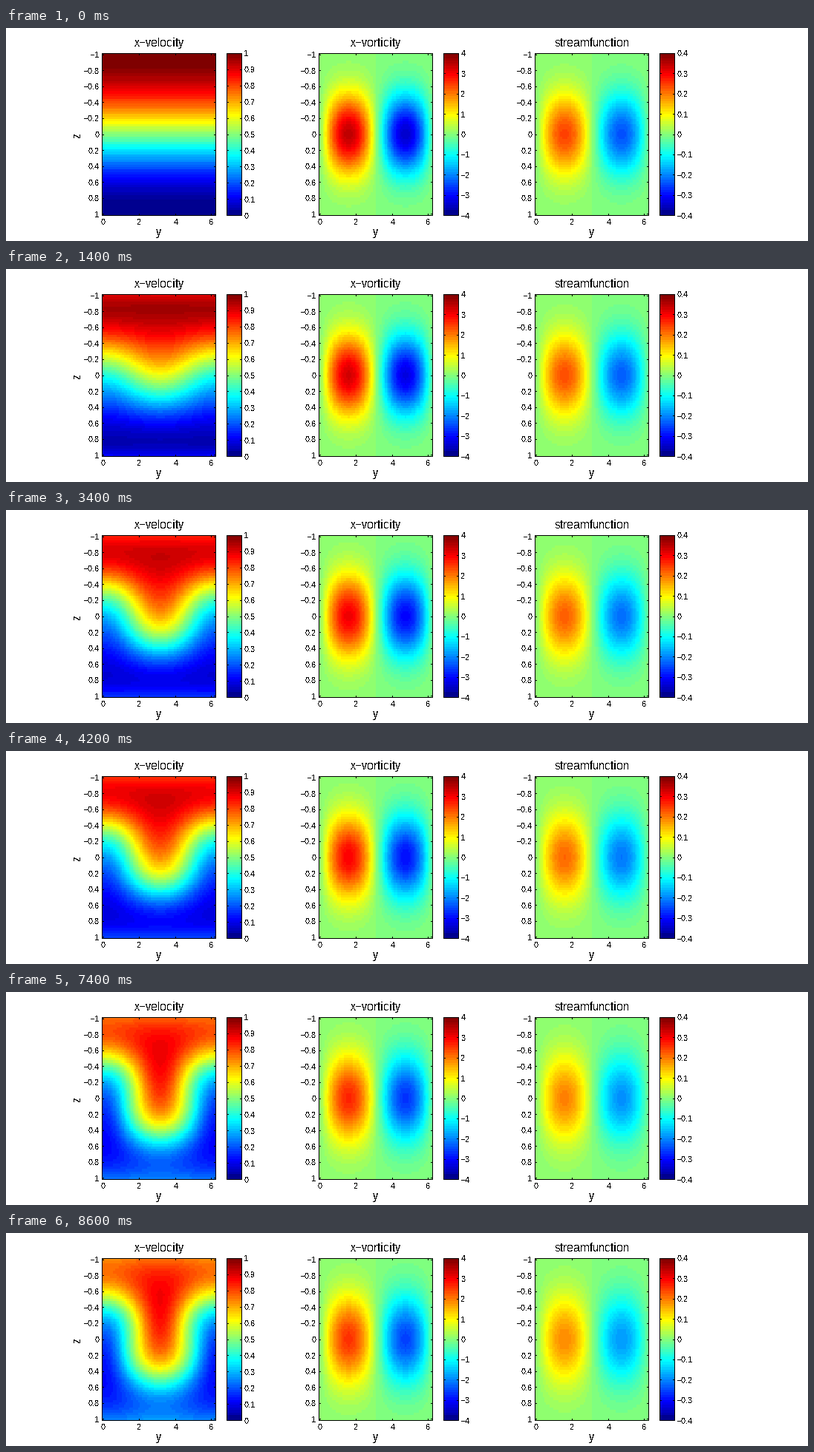
Recreate the animation shown at these times as a matplotlib script. Size 1080 by 288 pixels, loop 9200 ms.

```python
import numpy as np
import matplotlib.pyplot as plt
from matplotlib.animation import FuncAnimation
from matplotlib.colors import ListedColormap
from matplotlib.patches import Rectangle

plt.rcParams.update({
    "font.family": "Liberation Sans",
    "text.antialiased": False,
    "text.hinting": "native",
    "text.hinting_factor": 1,
})

W, H, DPI = 1080, 288, 100
PT = 72 / DPI                      # points per pixel
TOP, BOTTOM = 34.5, 253.5          # panel edges in pixels
BOX_W, BAR_X, BAR_W = 153, 168, 20
N = 64
FRAMES, STEP_MS = 46, 200

y = 2 * np.pi * np.arange(N) / N
z = np.linspace(-1, 1, N)
dy, dz = y[1], z[1] - z[0]
Y, Z = np.meshgrid(y, z)

NU_Y, NU_Z = 0.010, 0.007   # diffusivity of the streamwise velocity
LEAK = 2.1                  # wall loss coefficient
LIFT = 0.102                # peak vertical speed of the rolls


def jet64():
    i = np.arange(1, N + 1)

    def ramp(centre):
        return np.clip(1.5 - np.abs(i - centre) / 16, 0, 1)

    return ListedColormap(np.column_stack([ramp(48), ramp(32), ramp(16)]))


def roll_pair(peak, rate, width, growth, t):
    """Two counter-rotating rolls that fade and widen slowly."""
    shape = np.exp(-rate * t - Z**2 / (width + growth * t))
    return peak * shape * np.sin(Y + 1e-9)   # keeps the sign at pi definite


def vorticity(t):
    return roll_pair(3.45, 0.035, 0.248, 0.006, t)


def streamfunction(t):
    return roll_pair(0.243, 0.031, 0.26, 0.006, t)


def advance(u, t, dt):
    """One explicit step of advection and diffusion."""
    speed = LIFT * np.exp(-0.033 * t - 4 * Z**2)
    v = -8 * Z * speed * np.sin(Y)
    w = -speed * np.cos(Y)
    above = u[1] - 2 * dz * LEAK * (u[0] - 0.5)
    below = u[-2] - 2 * dz * LEAK * (u[-1] - 0.5)
    p = np.vstack([above, u, below])
    up, down = p[:-2], p[2:]
    left, right = np.roll(u, 1, axis=1), np.roll(u, -1, axis=1)
    flow = v * (right - left) / (2 * dy) + w * (down - up) / (2 * dz)
    spread = (NU_Y * (right - 2 * u + left) / dy**2
              + NU_Z * (down - 2 * u + up) / dz**2)
    return u + dt * (spread - flow)


def velocity_history(substeps=20):
    u = 0.5 - 0.5 * np.sin(np.pi * Z / 2)
    dt = STEP_MS / 1000 / substeps
    states = [u]
    for n in range(FRAMES - 1):
        for k in range(substeps):
            u = advance(u, (n * substeps + k) * dt, dt)
        states.append(u)
    return states


def held(n):
    """Step whose picture is on screen at step n."""
    if n >= 37:
        return 37 + 3 * ((n - 37) // 3)
    return max(0, n - 1 + n % 2)


fig = plt.figure(figsize=(W / DPI, H / DPI), dpi=DPI, facecolor="white")
ax = fig.add_axes([0, 0, 1, 1])
ax.axis("off")
cmap = jet64()


def label(x, base, text, size=11, **kw):
    ax.text(x, base, text, fontsize=size * PT, color="black", **kw)


def line(x0, y0, x1, y1):
    ax.plot([x0, x1], [y0, y1], color="black", lw=PT, snap=False,
            solid_capstyle="butt", zorder=4)


def frame(x, width):
    ax.add_patch(Rectangle((x, TOP), width, BOTTOM - TOP, fill=False,
                           ec="black", lw=PT, snap=False, zorder=5))


def side_ticks(x, width, py):
    py = np.floor(py) + 0.5
    line(x, py, x + 2.5, py)
    line(x + width - 2.5, py, x + width, py)


def number(value):
    return f"{value:.1g}".replace("-", "\u2212")


def panel(x, title, data, lo, hi, ticks):
    """Draw one field with its axes and colour bar; return its image."""
    extent = (x, x + BOX_W, BOTTOM, TOP)
    img = ax.imshow(data, cmap=cmap, vmin=lo, vmax=hi, extent=extent,
                    interpolation="nearest", aspect="auto", zorder=1)
    mid = x + BOX_W / 2
    label(mid, 25, title, 16, ha="center")
    label(mid - 1, 281, "y", 16, ha="center")

    cell = (BOTTOM - TOP) / N
    for k in range(-5, 6):
        py = 144 + k / 5 * (BOTTOM - TOP - cell) / 2
        side_ticks(x, BOX_W, py)
        label(x - 4, py + 4, number(k / 5), ha="right")
    for k in (0, 2, 4, 6):
        px = np.floor(x + BOX_W * (k / (2 * np.pi) + 0.5 / N)) + 0.5
        line(px, TOP, px, TOP + 2.5)
        line(px, BOTTOM - 2.5, px, BOTTOM)
        label(px, 266, number(k), ha="center")
    frame(x, BOX_W)

    bar = x + BAR_X
    ax.imshow(np.arange(N)[::-1, None], cmap=cmap, vmin=0, vmax=N,
              extent=(bar, bar + BAR_W, BOTTOM, TOP),
              interpolation="nearest", aspect="auto", zorder=1)
    for value in ticks:
        py = BOTTOM - (value - lo) / (hi - lo) * (BOTTOM - TOP)
        side_ticks(bar, BAR_W, py)
        label(bar + BAR_W + 3, py + 4, number(value), ha="left")
    frame(bar, BAR_W)
    return img


velocity = velocity_history()
images = [
    panel(129.5, "x\u2212velocity", velocity[0], 0, 1, np.arange(11) / 10),
    panel(421.5, "x\u2212vorticity", vorticity(0), -4, 4, range(-4, 5)),
    panel(712.5, "streamfunction", streamfunction(0), -0.4, 0.4,
          np.arange(-4, 5) / 10),
]
label(96, 144, "z", 16, rotation=90, ha="center", va="center")
ax.set_xlim(0, W)
ax.set_ylim(H, 0)


def update(n):
    k = held(n)
    t = k * STEP_MS / 1000
    for img, data in zip(images, (velocity[k], vorticity(t), streamfunction(t))):
        img.set_data(data)
    return images


anim = FuncAnimation(fig, update, frames=FRAMES, interval=STEP_MS,
                     repeat=True, repeat_delay=0, blit=False)
plt.show()
```
